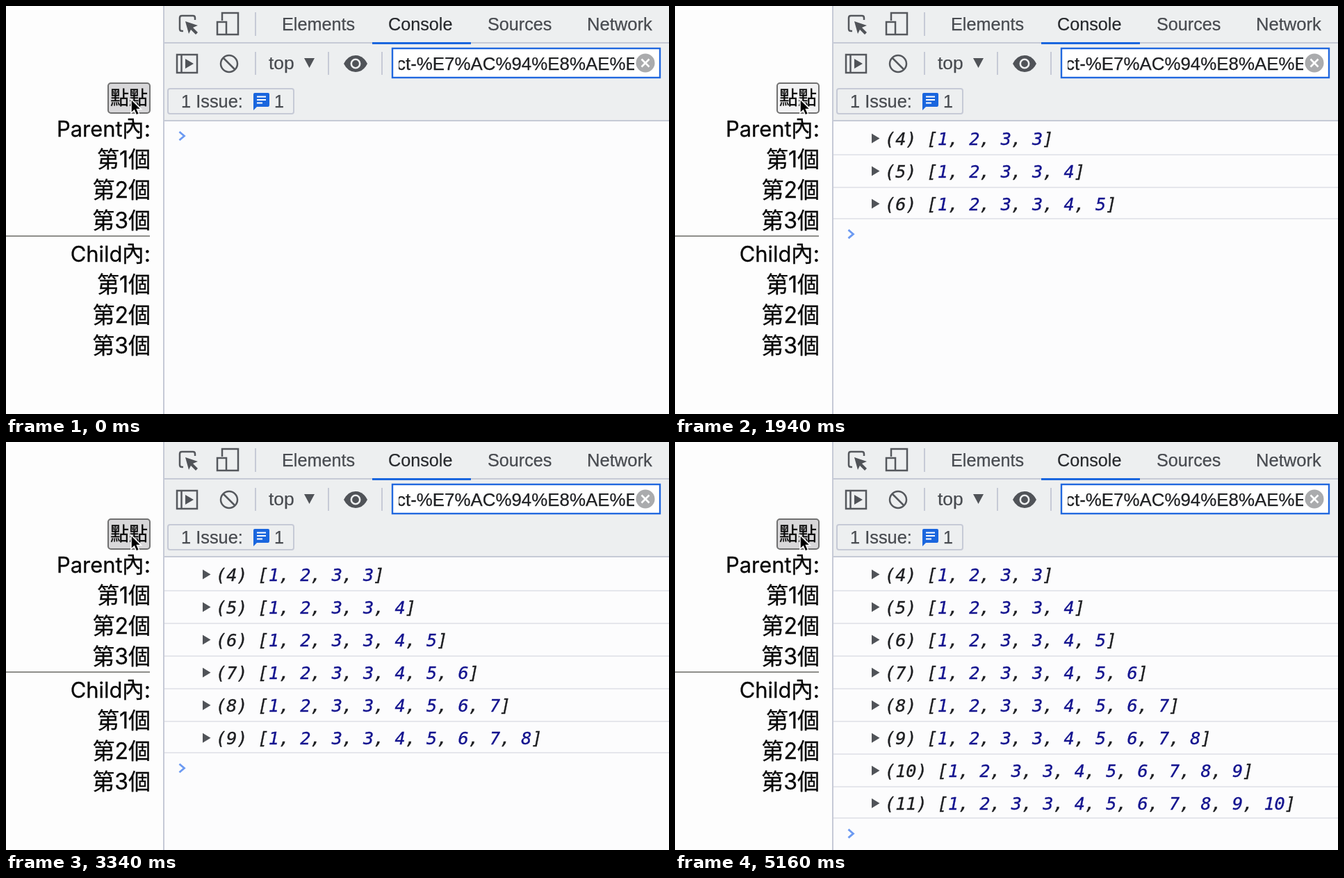
Write an HTML page that moves like this. It is 954x587 px and loops after 5.26 s.

```html
<!DOCTYPE html>
<html lang="zh-TW">
<head>
<meta charset="utf-8">
<style>
html, body { margin: 0; width: 100%; height: 100%; overflow: hidden; background: #fdfdfd; }
svg { display: block; width: 954px; height: 587px; }
text { white-space: pre; }
.page { font: 32px Inter, "Noto Sans CJK TC", "Noto Sans CJK", sans-serif; text-anchor: end; fill: #080808; stroke: #080808; stroke-width: .3; }
.ui { font: 25.2px "Liberation Sans", Arial, sans-serif; fill: #484b50; stroke: #484b50; stroke-width: .25; }
.log { font: italic 25.17px "DejaVu Sans Mono", monospace; fill: #1d1e21; stroke: #1d1e21; stroke-width: .35; }
.num { fill: #14148f; stroke: #14148f; }
.icon { fill: none; stroke: #55585d; stroke-width: 2.5; }
.solid { fill: #505358; }
.line { fill: none; stroke: #c6cad6; stroke-width: 2; }
.border { stroke: #e5e6ec; stroke-width: 2; }
</style>
</head>
<body>
<svg viewBox="0 0 954 587">
  <!-- page -->
  <rect id="button" x="147" y="111" width="60" height="43" rx="4" stroke="#707070" stroke-width="2"/>
  <g class="page">
    <text x="204" y="142" font-size="27">點點</text>
    <g id="lists"></g>
  </g>
  <path d="M0 331H207" stroke="#8e8e8a" stroke-width="2"/>
  <path d="M180 134V154L184.5 150L187.5 157L191.5 155.3L188.5 148.5H194.5Z" fill="#000" stroke="#fff" stroke-width="1.5"/>

  <!-- developer tools -->
  <rect x="227" width="727" height="587" fill="#fcfcfd"/>
  <rect x="227" width="727" height="165" fill="#edeff0"/>
  <path class="line" d="M227 0V587M227 53H954M227 165H954M359 9V43M359 66V99M464 66V99M541 66V99"/>
  <rect x="527" y="52" width="142" height="3" fill="#1a66de"/>
  <g class="ui">
    <text x="397" y="35">Elements</text>
    <text x="550" y="35" fill="#242629">Console</text>
    <text x="693" y="35">Sources</text>
    <text x="836" y="35" font-size="25.6">Network</text>
    <text x="378" y="91" font-size="26.4">top</text>
  </g>

  <path class="icon" d="M255 36H253Q250 36 250 33V17Q250 14 253 14H269Q272 14 272 17V20"/>
  <path class="solid" d="M258 22L276 28L269 31L276 38L273 41L266 34L263 40Z"/>
  <path class="icon" d="M311 21V10H334V41H318M304 23H317V41H304Z"/>
  <path class="icon" d="M246 70H275V96H246ZM252.5 70V96"/>
  <path class="solid" d="M258 76L270 83L258 90ZM429 75H444L436.5 89Z"/>
  <circle class="icon" cx="321" cy="83" r="12"/>
  <path class="icon" d="M312.5 74.5L329.5 91.5"/>
  <path class="solid" d="M486 83Q492 71 503 71Q514 71 520 83Q514 95 503 95Q492 95 486 83Z"/>
  <circle cx="503" cy="83" r="6.2" fill="#505358" stroke="#edeff0" stroke-width="2.6"/>

  <rect x="556" y="61" width="385" height="42" fill="#fff" stroke="#2168df" stroke-width="2.4"/>
  <svg x="565" y="63" width="339" height="38">
    <text class="ui" x="-3" y="29" style="fill:#1f2023;stroke:#1f2023;font-size:25.9px">ct-%E7%AC%94%E8%AE%E8</text>
  </svg>
  <circle cx="920" cy="82" r="13.5" fill="#aaabad"/>
  <path d="M914.5 76.5L925.5 87.5M925.5 76.5L914.5 87.5" stroke="#fff" stroke-width="2.6"/>

  <rect class="line" x="233" y="119" width="181" height="36" rx="3"/>
  <g class="ui">
    <text x="252" y="146" font-size="25.4">1 Issue:</text>
    <text x="386" y="146">1</text>
  </g>
  <path d="M358 125H377Q379 125 379 127V142Q379 145 377 145H361L356 150V127Q356 125 358 125Z" fill="#1a66de"/>
  <path d="M361 130.5H374M361 135H374M361 139.5H369" stroke="#fff" stroke-width="2"/>

  <g id="rows"></g>
  <path id="prompt" d="M249.5 181L256.5 187L249.5 193" fill="none" stroke="#6c9af2" stroke-width="2.8"/>
</svg>
<script>
const LOOP = 5260, STEP = 47.05, PRESS = 160;
const clicks = [420, 980, 1480, 2000, 2400, 2830, 3940, 4560];
const $ = id => document.getElementById(id);

$('lists').innerHTML = [['Parent', 188], ['Child', 368]].map(([name, y]) =>
  `<text x="167.5" y="${y}" font-size="30.9">${name}</text><text x="208" y="${y}">內:</text>` +
  [1, 2, 3].map(n => `<text x="208" y="${y + 44 * n}">第${n}個</text>`).join('')
).join('');

$('rows').innerHTML = clicks.map((_, i) => {
  const y = 190.5 + STEP * i;
  const values = [1, 2, 3];
  for (let n = 3; n <= i + 3; n++) values.push(n);
  const items = values.map(n => `<tspan class="num">${n}</tspan>`).join(', ');
  return `<g><path class="solid" d="M283 ${y - 7}L294.5 ${y}L283 ${y + 7}Z"/>` +
    `<text class="log" x="302" y="${y + 9}">(${values.length}) [${items}]</text>` +
    `<path class="border" d="M228 0H954"/></g>`;
}).join('');
const rows = [...$('rows').children];

function draw(now) {
  const t = now % LOOP;
  const count = clicks.filter(c => t >= c).length;
  rows.forEach((row, i) => {
    row.style.display = i < count ? '' : 'none';
    const y = (i === count - 1 ? 212 : 214) + STEP * i;
    row.lastChild.setAttribute('transform', `translate(0 ${Math.round(y)})`);
  });
  $('prompt').setAttribute('transform', `translate(0 ${STEP * count})`);
  const pressed = clicks.some(c => t >= c - PRESS && t < c);
  $('button').setAttribute('fill', pressed ? '#f1f1f2' : '#d8d7d9');
}

const start = performance.now();
function tick() {
  draw(performance.now() - start);
  requestAnimationFrame(tick);
}
tick();
</script>
</body>
</html>
```
